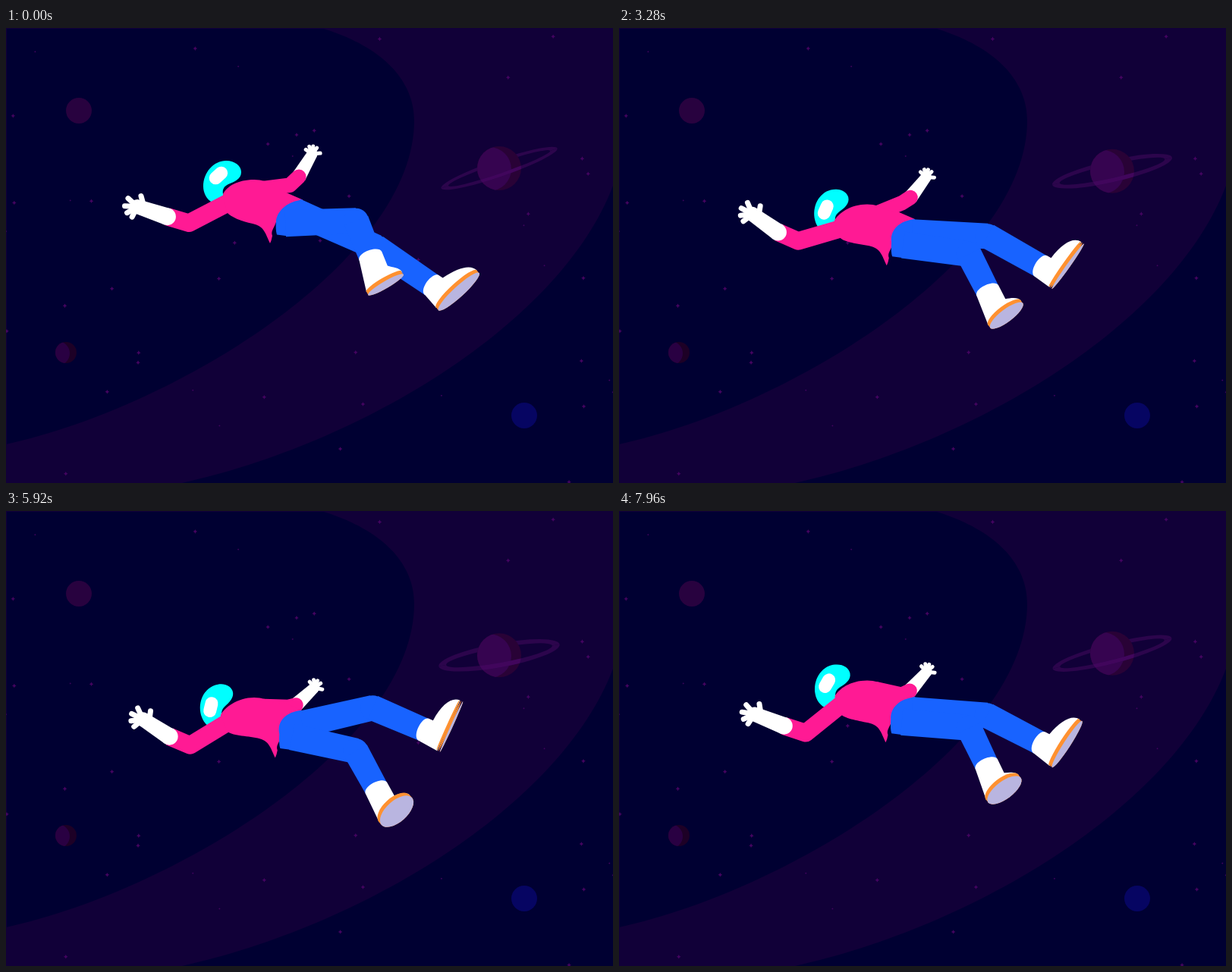
Write an HTML page with a canvas that moves like this. It is 800 by 600 pixels and loops after 8 s.

```html
<!DOCTYPE html>
<html lang="en">
<head>
<meta charset="utf-8">
<title>Drifting in space</title>
<style>
  html, body { margin: 0; width: 100%; height: 100%; overflow: hidden; background: #000032; }
  canvas { display: block; width: 800px; height: 600px; }
</style>
</head>
<body>
<canvas id="stage" width="800" height="600"></canvas>
<script>
const ctx = document.getElementById('stage').getContext('2d');
const LOOP = 8000;
const HALF_SWING = 5300;
const PINK = '#ff1a94', BLUE = '#1863ff', WHITE = '#fff', CYAN = '#00ffff';
const ORANGE = '#ff9130', LAVENDER = '#b9b5e0';
let time = 0;

// Every part floats between two poses on one slow wave, some with a lag in ms.
const wave = lag => (1 - Math.cos(Math.PI * (time - lag) / HALF_SWING)) / 2;
const sway = (a, b, lag = 0) => a + (b - a) * wave(lag);
const drift = (p, q, lag = 0) => [sway(p[0], q[0], lag), sway(p[1], q[1], lag)];

const rad = deg => deg * Math.PI / 180;
const add = (p, v, k = 1) => [p[0] + v[0] * k, p[1] + v[1] * k];
const mid = (p, q) => [(p[0] + q[0]) / 2, (p[1] + q[1]) / 2];
const perp = v => [-v[1], v[0]];
function unit(p, q) {
  const dx = q[0] - p[0], dy = q[1] - p[1], len = Math.hypot(dx, dy) || 1;
  return [dx / len, dy / len];
}

function fill(color, build) {
  ctx.fillStyle = color;
  ctx.beginPath();
  build();
  ctx.fill();
}
const move = p => ctx.moveTo(p[0], p[1]);
const line = p => ctx.lineTo(p[0], p[1]);
const curve = (a, b, c) => ctx.bezierCurveTo(a[0], a[1], b[0], b[1], c[0], c[1]);
const quad = (a, b) => ctx.quadraticCurveTo(a[0], a[1], b[0], b[1]);
const trace = points => points.forEach((p, i) => i ? line(p) : move(p));
const disc = (color, p, r) => fill(color, () => ctx.arc(p[0], p[1], r, 0, 7));
const oval = (color, p, a, b, turn) =>
  fill(color, () => ctx.ellipse(p[0], p[1], a, b, turn, 0, Math.PI * 2));

// Straight limb piece that tapers from half width r1 to r2.
function taper(color, p, q, r1, r2) {
  const n = perp(unit(p, q));
  fill(color, () => trace([add(p, n, r1), add(q, n, r2), add(q, n, -r2), add(p, n, -r1)]));
}
function stroke(color, width, points, cap = 'round') {
  ctx.strokeStyle = color;
  ctx.lineWidth = width;
  ctx.lineCap = cap;
  ctx.lineJoin = 'round';
  ctx.beginPath();
  trace(points);
  ctx.stroke();
}
function placed(p, deg, draw) {
  ctx.save();
  ctx.translate(p[0], p[1]);
  ctx.rotate(rad(deg));
  draw();
  ctx.restore();
}
function clipped(p, r, draw) {
  ctx.save();
  ctx.beginPath();
  ctx.arc(p[0], p[1], r, 0, 7);
  ctx.clip();
  draw();
  ctx.restore();
}

function drawStars() {
  let seed = 11;
  const random = () => (seed = seed * 16807 % 2147483647) / 2147483647;
  for (let n = 0; n < 46; n++) {
    const x = random() * 800, y = random() * 600, r = n % 4 ? 2.8 : 1.3;
    fill('#440460', () => {
      for (let i = 0; i < 8; i++) {
        const d = i % 2 ? r * 0.5 : r, a = i * Math.PI / 4;
        ctx.lineTo(x + d * Math.cos(a), y + d * Math.sin(a));
      }
    });
  }
}

function shadedPlanet(p, r, dark, light, shift, lightR) {
  disc(dark, p, r);
  clipped(p, r, () => disc(light, add(p, [-shift, 1]), lightR));
}

function drawSky() {
  ctx.fillStyle = '#000032';
  ctx.fillRect(0, 0, 800, 600);
  fill('#110038', () => {
    move([415, 0]);
    curve([490, 22], [538, 65], [538, 122]);
    curve([538, 303], [232, 498], [0, 549]);
    line([0, 600]);
    line([232, 600]);
    curve([468, 548], [731, 390], [800, 208]);
    line([800, 0]);
  });
  ctx.fillRect(0, 0, 1, 600);
  ctx.fillRect(0, 0, 800, 1);
  drawStars();
  disc('#28023f', [96, 109], 17);
  disc('#060562', [683, 511], 17);
  shadedPlanet([79, 428], 14, '#1d0026', '#290042', 11, 16);
}

function drawSaturn() {
  const globe = [650, sway(185, 190.5)], open = sway(11, 16), tilt = sway(-19, -10);
  const ring = (color, from, to) => placed(globe, tilt, () => fill(color, () => {
    ctx.ellipse(0, 0, 81, open, 0, from, to);
    ctx.ellipse(0, 0, 71, open * 0.62, 0, to, from, true);
  }));
  ring('#2c054c', Math.PI, Math.PI * 2);
  shadedPlanet(globe, 29, '#290236', '#360450', 13, 29);
  ring('#2c054c', 0, Math.PI);
  clipped(globe, 29, () => ring('#41065c', 0, Math.PI));
}

function drawHead() {
  placed(drift([284, 199], [277, 256.5]), sway(0, -21), () => {
    fill(CYAN, () => {
      move([-12, 31]);
      curve([-20, 27], [-24, 18], [-24, 10]);
      curve([-24, -9], [-10, -24], [6, -24]);
      curve([18, -24], [26, -17], [26, -9]);
      curve([26, 0], [17, 4], [9, 7]);
      curve([3, 10], [1, 14], [2, 20]);
      line([3, 28]);
    });
    placed(drift([-4, -4.5], [-8.5, 1.5]), sway(-42, -57), () =>
      stroke(WHITE, 17, [[-5, 0], [5, 0]]));
  });
}

function drawHand(palm, deg, r, width, thumbBase, tips) {
  placed(palm, deg, () => {
    disc(WHITE, [0, 0], r);
    tips.forEach((tip, i) => stroke(WHITE, width, [i ? [0, 0] : thumbBase, tip]));
  });
}

function drawLeftArm(shoulder) {
  const elbow = [sway(236, 246, 2700), sway(255, 309, 700)];
  const cuff = [sway(209, 217.5, 2400), sway(246, 297.5, 800)];
  const palm = [sway(172.5, 180.5, 900), sway(230, 276, 1200)];
  stroke(PINK, 23.5, [shoulder, elbow, cuff], 'butt');
  taper(WHITE, cuff, palm, 11.3, 9.5);
  disc(WHITE, cuff, 11.3);
  drawHand(palm, sway(-2, 28, -800), 9.5, 7, [8, -3],
    [[5, -14], [-12, -11], [-16.5, -1], [-13.5, 8], [-7, 13.5]]);
}

function drawRightArm(shoulder) {
  const lag = 700;
  const elbow = drift([374, 205], [372, 258.5], lag);
  const cuff = drift([386, 193.5], [382, 256], lag);
  const palm = drift([403.5, 163], [406.5, 233], lag);
  taper(WHITE, cuff, palm, 9.5, 7);
  drawHand(palm, sway(0, 18, lag), 7, 5, [0, 0],
    [[-8.5, -5.5], [-4, -9.5], [1, -10], [6, -8], [10.5, -1]]);
  stroke(PINK, 19.5, [shoulder, elbow, cuff]);
}

function drawTorso(waist) {
  const collar = drift([286, 219], [282.5, 271]);
  const armpit = drift([291, 243], [291.5, 292]);
  const tail = drift([348, 284], [355, 327]);
  const top = sway(200, 247.5);
  drawRightArm([340, top + 11.5]);
  drawLeftArm(add(mid(collar, armpit), [5, -1]));
  fill(PINK, () => {
    move(collar);
    curve(add(collar, [5, -10]), [305, top], [327, top]);
    quad([342, top], [354, top + 8]);
    line(add(waist, [-23, -10]));
    line(waist);
    line(add(waist, [-10, 20]));
    line(add(tail, [8, -28]));
    curve(add(tail, [4, -18]), add(tail, [1, -16]), add(tail, [3, -10]));
    quad(add(tail, [2, -4]), tail);
    curve(add(tail, [-6, -13]), add(tail, [-8, -23]), add(tail, [-23, -26]));
    curve(add(tail, [-38, -29]), add(armpit, [5, 6]), armpit);
  });
}

function drawBoot({ knee, ankle, sole, tilt, open, half, step, bulge }) {
  const u = unit(knee, ankle), n = perp(u);
  const left = add(ankle, n, 16), right = add(ankle, n, -16);
  const turn = rad(tilt), d = [Math.cos(turn), Math.sin(turn)], up = [d[1], -d[0]];
  const base = add(sole, up, 4), heel = add(base, d, -half), toe = add(base, d, half);
  fill(WHITE, () => {
    move(left);
    line(heel);
    line(toe);
    curve(add(toe, up, bulge * 0.65), add(add(toe, d, -bulge * 0.8), up, bulge * 1.1),
      add(right, u, step));
    line(right);
    curve(add(right, u, -10), add(left, u, -12), left);
  });
  for (const lift of [5, 2.5, 0]) oval(ORANGE, add(sole, up, lift), half, Math.max(open, 1.2), turn);
  oval(LAVENDER, sole, half, open, turn);
}

function drawLeg(hip, leg) {
  const { knee, ankle } = leg;
  taper(BLUE, add(hip, unit(hip, knee), -3), knee, 17.7, 16.8);
  disc(BLUE, knee, 16.3);
  taper(BLUE, knee, ankle, 16.8, 15.8);
}

function drawLegs(waist) {
  const near = {
    knee: drift([461.5, 254], [461, 318.5]),
    ankle: drift([480.5, 301], [488.5, 368]),
    sole: drift([500.5, 338.5], [515.5, 398]),
    tilt: sway(-30, -42, 300), open: sway(4, 14, 900),
    half: 27, step: 20, bulge: 10
  };
  const far = {
    knee: drift([488, 290], [483.5, 259.5], 600),
    ankle: drift([562, 341], [551, 288.5], 600),
    sole: drift([597, 349], [587, 284.5], 500),
    tilt: sway(-42, -65.5, 500), open: sway(7, 1, -300),
    half: 36.5, step: 6, bulge: 18
  };
  const corner = drift([357, 272.5], [361.5, 314.5]), seat = add(corner, [15, 2]);
  const nearHip = add(seat, perp(unit(add(seat, [0, -17]), near.knee)), -17);
  const farHip = add(waist, perp(unit(add(waist, [0, 18]), far.knee)), 18);
  fill(BLUE, () => {
    move(waist);
    curve(add(waist, [-20, 2]), add(waist, [-33, 14]), add(corner, [-1, -19]));
    quad(add(corner, [-2, -6]), corner);
    line(seat);
    line(add(nearHip, [12, 0]));
    line(add(farHip, [4, 0]));
  });
  drawLeg(farHip, far);
  drawLeg(nearHip, near);
  drawBoot(far);
  drawBoot(near);
}

function frame() {
  time = (performance.now() - start) % LOOP;
  const waist = drift([391, 226.5], [389.5, 264]);
  drawSky();
  drawSaturn();
  drawHead();
  drawTorso(waist);
  drawLegs(waist);
  requestAnimationFrame(frame);
}
const start = performance.now();
frame();
</script>
</body>
</html>
```
